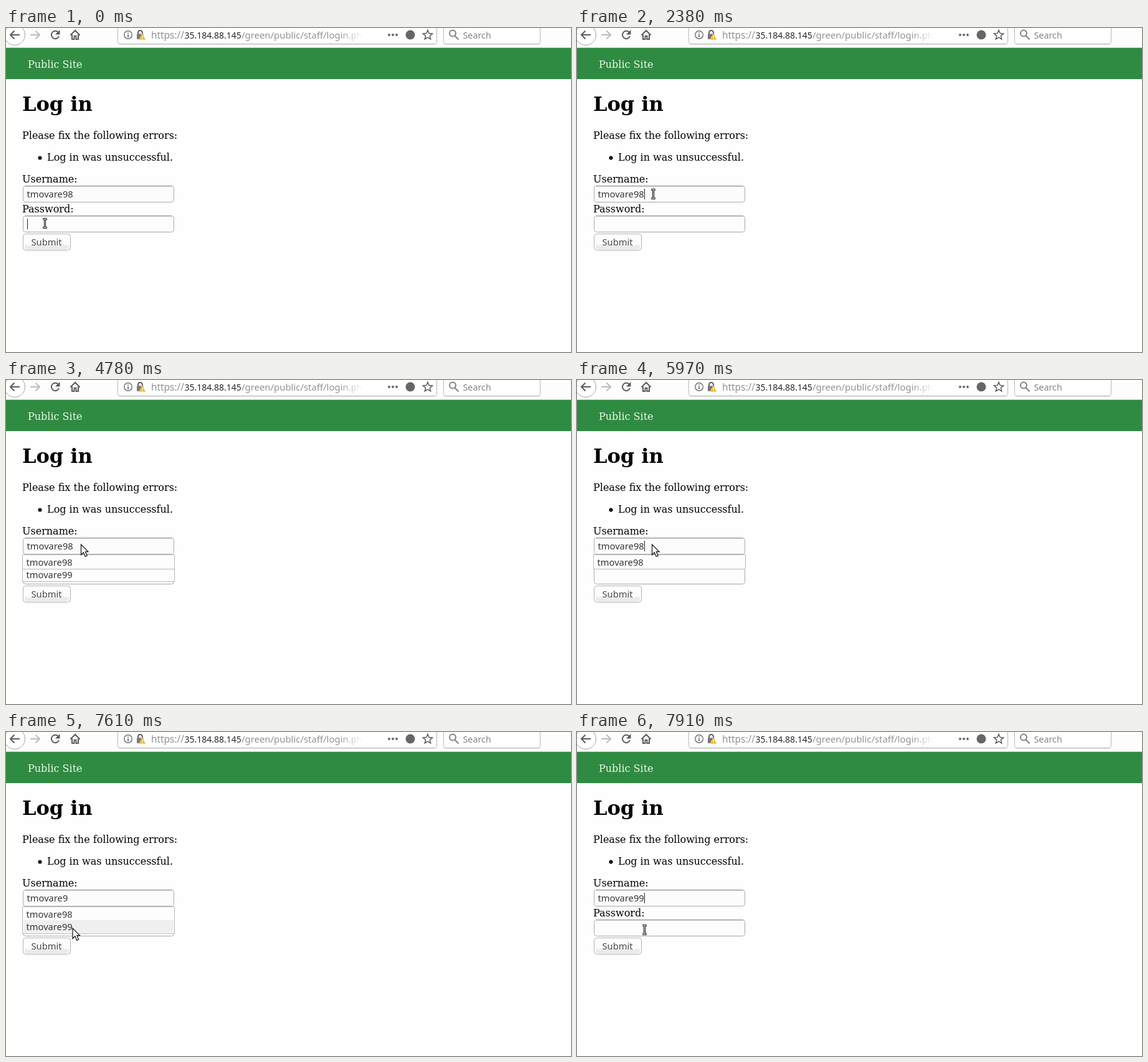
Write an HTML page that moves like this. It is 907 px wide and 520 px high and loops after 8000 ms.

```html
<!DOCTYPE html>
<html lang="en">
<head>
<meta charset="utf-8">
<title>Log in</title>
<style>
  html, body { margin: 0; width: 100%; height: 100%; overflow: hidden; background: #fefefe; }
  svg { display: block; width: 907px; height: 520px; }
  text { font: 16px "DejaVu Serif", serif; fill: #000; white-space: pre; }
  .ui { font: 14.7px "Noto Sans", "Open Sans", sans-serif; fill: #363636; }
  .icon { fill: none; stroke: #5c5c5c; stroke-width: 2; }
  .box { fill: #fff; stroke: #b9b9b9; }
  .field { fill: #fcfcfc; stroke: #a9a9a9; }
  .inset { stroke: #8d8d8d; }
  .focus .field { stroke: #4a90c0; }
  .focus .inset { stroke: #4a90c0; }
  .focus .shade { display: none; }
  .popup { fill: #fdfdfd; stroke: #b8b8b8; }
  .caret { fill: #222; }
</style>
</head>
<body>
<svg viewBox="0 0 907 520">
  <defs>
    <linearGradient id="fade">
      <stop offset="0" stop-color="#fff" stop-opacity="0"/>
      <stop offset="1" stop-color="#fff"/>
    </linearGradient>
    <linearGradient id="face" x2="0" y2="1">
      <stop offset="0" stop-color="#fefefe"/>
      <stop offset=".68" stop-color="#fafafa"/>
      <stop offset=".76" stop-color="#ececec"/>
      <stop offset="1" stop-color="#e8e8e8"/>
    </linearGradient>
    <g id="input">
      <rect class="field" x="27.5" y=".5" width="242" height="26" rx="4"/>
      <path class="shade" d="M29 1.5H268" stroke="#dedede"/>
      <path class="inset" d="M30.5 .5H266.5"/>
    </g>
  </defs>

  <!-- toolbar -->
  <rect width="907" height="31" fill="#fdfdfd"/>
  <circle cx="14" cy="11" r="16.5" fill="#fff" stroke="#a4a4a4"/>
  <path class="icon" d="M22 11H7M13.500 4.500 7 11l6.500 6.500"/>
  <path class="icon" style="stroke:#bcbcbc" d="M39 11H54M47.500 4.500 54 11l-6.500 6.500"/>
  <path class="icon" d="M83.500 6.500A6.200 6.200 0 1 0 85 13"/>
  <path d="M86.500 3v7.500H79z" fill="#5c5c5c"/>
  <path class="icon" d="M103.500 11.500 111 4l7.500 7.500M106 10.500V18h3.500v-5h3v5H116v-7.500"/>

  <rect class="box" x="179.500" y="-5.500" width="512" height="31" rx="3"/>
  <path d="M181 26.500H690" stroke="#e0e0e0"/>
  <circle class="icon" cx="196" cy="11" r="6.300" style="stroke-width:1.200"/>
  <path class="icon" d="M196 10v5M196 7v1.600" style="stroke-width:1.500"/>
  <path class="icon" d="M212 10V7.500a3.500 3.500 0 0 1 7 0V10"/>
  <rect x="210" y="9.500" width="11" height="8.500" rx="1" fill="#777"/>
  <path d="M219 9l5.500 10h-11z" fill="#f6b519" stroke="#fff" stroke-width=".6"/>
  <path d="M219 12.500v3M219 16.500v1.200" stroke="#fff" stroke-width="1.300"/>
  <text class="ui" x="233" y="17" style="font-size:15.400px;fill:#929292">https://</text>
  <text class="ui" x="286.500" y="17" style="font-size:14px;fill:#262626">35.184.88.145</text>
  <text class="ui" x="378" y="17" style="font-size:14.900px;fill:#929292">/green/public/staff/login.ph</text>
  <rect x="535" y="1" width="38" height="23" fill="url(#fade)"/>
  <g fill="#666">
    <circle cx="615" cy="11" r="2"/><circle cx="621" cy="11" r="2"/><circle cx="627" cy="11" r="2"/>
    <circle cx="649" cy="11" r="7.500"/>
  </g>
  <path id="star" class="icon" style="stroke-width:1.500"/>
  <rect class="box" x="702.500" y="-5.500" width="155" height="31" rx="3"/>
  <path d="M704 26.500H856" stroke="#e0e0e0"/>
  <path class="icon" style="stroke:#858585" d="M720.500 12.500l6 6M722 8.500a5 5 0 1 1-10 0 5 5 0 0 1 10 0z"/>
  <text class="ui" x="733.500" y="17" style="font-size:14.300px;fill:#858585">Search</text>

  <!-- page -->
  <rect y="31" width="907" height="1" fill="#c9d6cb"/>
  <rect y="32" width="907" height="50" fill="#2e8b41"/>
  <text x="35" y="64" style="fill:#f2f5ee">Public Site</text>
  <text x="26" y="133" style="font-size:32px;font-weight:bold">Log in</text>
  <text x="26" y="178">Please fix the following errors:</text>
  <circle cx="54.500" cy="208.500" r="3"/>
  <text x="66" y="213">Log in was unsuccessful.</text>
  <text x="26" y="248">Username:</text>
  <g id="user"><use href="#input" y="253"/></g>
  <text id="value" class="ui" x="33.500" y="272"></text>
  <text x="26" y="296">Password:</text>
  <g id="pass"><use href="#input" y="301"/></g>
  <rect x="27.500" y="330.500" width="76" height="26" rx="4" fill="#fdfdfd" stroke="#b2b2b2"/>
  <rect x="30" y="332" width="71" height="23" rx="3" fill="url(#face)"/>
  <text class="ui" x="40.500" y="349" style="fill:#4a4a4a">Submit</text>

  <!-- suggestions -->
  <g id="tall">
    <rect class="popup" x="26.500" y="280.500" width="244" height="43"/>
    <rect id="row" x="28" y="302" width="241" height="20"/>
    <text id="second" class="ui" x="32.500" y="318">tmovare99</text>
  </g>
  <rect id="short" class="popup" x="26.500" y="280.500" width="244" height="23"/>
  <text id="first" class="ui" x="32.500" y="298">tmovare98</text>

  <rect id="caret" class="caret" width="1" height="17"/>
  <g id="beam" fill="none">
    <path id="stem" d="M-3-7H-1.500Q0-7 0-5.500V5.500Q0 7-1.500 7H-3M3-7H1.500Q0-7 0-5.500M0 5.500Q0 7 1.500 7H3" stroke="#000" stroke-width="3"/>
    <use href="#stem"/>
    <path d="M-3-7H3M0-7V7M-3 7H3" stroke="#fff"/>
  </g>
  <path id="arrow" d="M.5.500V17L4.300 13.300 7.200 19.800 10.200 18.500 7.300 12.200H12z" fill="#fff" stroke="#111" stroke-width="1.200"/>
</svg>
<script>
const LOOP = 8000;
const $ = id => document.getElementById(id);
const full = "tmovare98", cut = "tmovare9", picked = "tmovare99";

// Each step changes only the listed properties of the state before it.
// caret: x position or 0; popup: bit 1 = two rows, bit 2 = one row
const steps = [
  [0, { value: full, focus: "pass", caret: 34, popup: 0, row: "none", pointer: "beam", at: [62.5, 313.5] }],
  [300, { at: [62.5, 315.5] }],
  [440, { at: [62.5, 316.5] }],
  [590, { caret: 0 }],
  [1640, { caret: 34 }],
  [1940, { at: [91.5, 299.5] }],
  [2090, { at: [122, 277.5] }],
  [2230, { at: [122.5, 266.5] }],
  [2380, { focus: "user", caret: 108 }],
  [3580, { caret: 0 }],
  [3730, { value: cut, caret: 100, popup: 1, pointer: "arrow", at: [120, 263.5] }],
  [4780, { value: full, caret: 0, popup: 3 }],
  [4920, { popup: 2 }],
  [5970, { caret: 108 }],
  [6570, { value: cut, caret: 100, popup: 1 }],
  [7170, { caret: 0, at: [121.5, 266.5] }],
  [7320, { at: [121.5, 294.5] }],
  [7460, { at: [113.5, 308.5] , row: "#efefef" }],
  [7610, { at: [106.5, 314.5] }],
  [7760, { row: "#f07746", pointer: "beam", at: [108.5, 317.5] }],
  [7910, { value: picked, caret: 108, popup: 0, row: "none" }]
];

let last = {};
const states = steps.map(([time, change]) => ({ time, ...(last = { ...last, ...change }) }));

const show = (id, on) => { $(id).style.display = on ? "" : "none"; };

function draw(s) {
  $("value").textContent = s.value;
  for (const id of ["user", "pass"]) $(id).setAttribute("class", s.focus === id ? "focus" : "");
  show("caret", s.caret);
  $("caret").setAttribute("x", s.caret);
  $("caret").setAttribute("y", s.focus === "user" ? 258 : 306);
  show("tall", s.popup & 1);
  show("short", s.popup & 2);
  show("first", s.popup);
  $("row").setAttribute("fill", s.row);
  $("second").style.fill = s.row === "#f07746" ? "#fff" : "";
  for (const id of ["beam", "arrow"]) show(id, s.pointer === id);
  $(s.pointer).setAttribute("transform", `translate(${s.at})`);
}

const star = Array.from({ length: 10 }, (_, i) => {
  const a = i * Math.PI / 5, r = i % 2 ? 3.6 : 8;
  return [677 + r * Math.sin(a), 11.5 - r * Math.cos(a)].map(v => v.toFixed(1));
});
$("star").setAttribute("d", `M${star.join("L")}Z`);

let current;
function tick() {
  const t = performance.now() % LOOP;
  const s = states.findLast(x => x.time <= t);
  if (s !== current) draw(current = s);
  requestAnimationFrame(tick);
}
tick();
</script>
</body>
</html>
```
